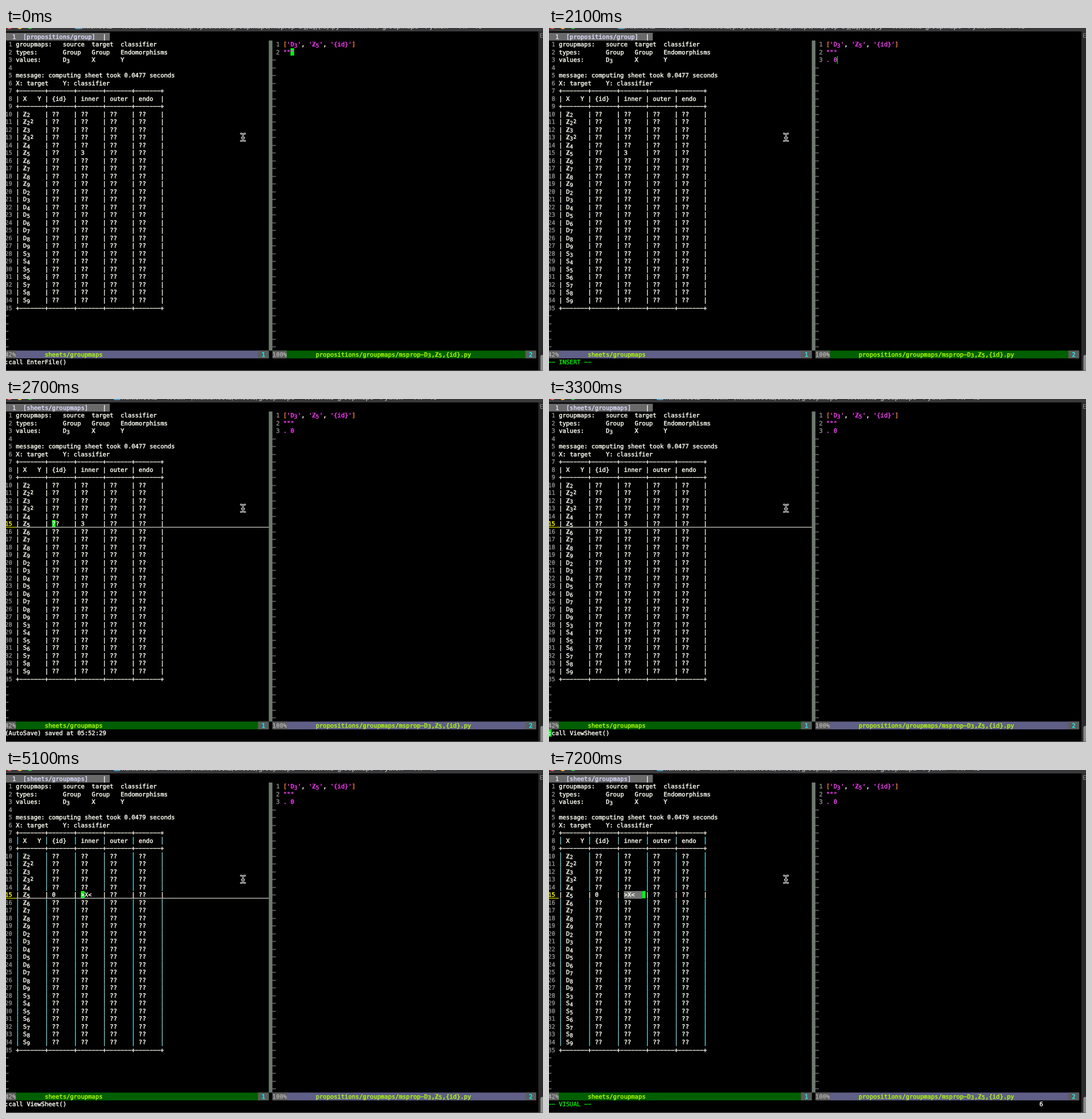
Write an HTML page that moves like this. It is 937 px wide and 598 px high and loops after 8000 ms.

```html
<!DOCTYPE html>
<html lang="en">
<head>
<meta charset="utf-8">
<title>Group maps sheet</title>
<style>
  html, body { margin: 0; width: 100%; height: 100%; overflow: hidden; background: #000; }
  svg { display: block; width: 937px; height: 598px; }
  text { text-rendering: geometricPrecision; }
  .mono { font: 10.473px "DejaVu Sans Mono", "DejaVu Sans", monospace; stroke-width: .42px; }
  .title { font: 600 11.6px Inter, "Open Sans", sans-serif; fill: #b4b4b6; }
</style>
</head>
<body>
<svg id="stage" viewBox="0 0 937 598"></svg>
<script>
const LOOP = 8000, CW = 6.305, CH = 13.515, LEFT = -1.7, TOP = 8.3;
const ROWS = 41, SPLIT = 73, RIGHT = 74, GUTTER = 3, CURSOR_ROW = 15;
const C = {
  text: '#fffff4', num: '#8c8c8c', tilde: '#7c7c84', split: '#6e7a70',
  active: '#005f00', idle: '#5f5f87', lime: '#afff00', seg: '#5c5c5c',
  cyan: '#00ffff', rule: '#6fd8dc', string: '#ff3cff', bracket: '#ff8038',
  cursor: '#00f516', select: '#747474', mode: '#00ee00', yellow: '#ffff00'
};
const PIPES = [0, 8, 16, 24, 32, 40];
const SUB = '₀₁₂₃₄₅₆₇₈₉';
const sub = (letter, from, to) =>
  Array.from({ length: to - from + 1 }, (_, i) => letter + SUB[from + i]);
const GROUPS = ['ℤ₂', 'ℤ₂²', 'ℤ₃', 'ℤ₃²', ...sub('ℤ', 4, 9), ...sub('D', 2, 9), ...sub('S', 3, 9)];
const PROP = 'propositions/groupmaps/msprop-D₃,ℤ₅,{id}.py';
const SHEET = 'sheets/groupmaps';

// Each step changes part of the state; cursor is [row, column, shape].
const right = (row, col, shape) => [row, RIGHT + GUTTER + col, shape];
const cell = col => [CURSOR_ROW, GUTTER + col, 'block'];
const visual = (col, count) => ({ cursor: cell(col), cmd: '-- VISUAL --', count, line: false });
const STEPS = [
  [0, { file: PROP, icon: 121, tab: 'propositions/group', cmd: ':call EnterFile()',
        cursor: right(2, 2, 'block'), typed: null, sheet: false, done: false, line: false, count: 0 }],
  [300, { file: PROP + ' [+]', icon: 112, cmd: '-- INSERT --', typed: '', cursor: right(3, 0, 'bar') }],
  [600, { typed: '.', cursor: right(3, 1, 'bar') }],
  [900, { typed: '. ', cursor: right(3, 2, 'bar') }],
  [1800, { typed: '. 0', cursor: right(3, 3, 'bar') }],
  [2100, { file: PROP, icon: 121 }],
  [2250, { cmd: '(AutoSave) saved at 05:52:29', cursor: right(3, 2, 'block') }],
  [2550, { file: SHEET, icon: 188 }],
  [2700, { tab: SHEET, sheet: true, line: true, cursor: cell(10) }],
  [3300, { cmd: ':call ViewSheet()', cursor: [42, 0, 'block'] }],
  [3450, { done: true, cursor: cell(10) }],
  [4200, { cursor: cell(16) }],
  [4800, { cursor: cell(17) }],
  [5100, { cursor: cell(18) }],
  [5400, visual(18, 1)],
  [5700, visual(19, 2)],
  [6150, visual(20, 3)],
  [6600, visual(24, 7)],
  [7200, visual(23, 6)]
];

const px = col => LEFT + col * CW;
const py = row => TOP + row * CH;
const esc = s => s.replace(/&/g, '&amp;').replace(/</g, '&lt;').replace(/>/g, '&gt;');
const rect = (x, y, w, h, fill, extra = '') =>
  `<rect x="${x}" y="${y}" width="${w}" height="${h}" fill="${fill}" ${extra}/>`;
const fillCells = (row, col, n, fill) => rect(px(col), py(row), n * CW, CH, fill);

// Words sit on the character grid; raised and lowered digits are large.
function put(row, col, str, color = C.text) {
  const base = py(row) + 10.2;
  const span = m => {
    const x = px(col + m.index), digit = SUB.indexOf(m[0]);
    if (digit >= 0) return `<tspan x="${x}" y="${base + 1.8}" font-size="9.4">${digit}</tspan>`;
    if (m[0] === '²') return `<tspan x="${x}" y="${base - 1.4}" font-size="9">2</tspan>`;
    return `<tspan x="${x}" y="${base}">${esc(m[0])}</tspan>`;
  };
  const words = [...str.replace(/-/g, '−').matchAll(/[ℤ₀-₉²]|[^ℤ₀-₉²\s]+/g)];
  return `<text class="mono" fill="${color}" stroke="${color}">${words.map(span).join('')}</text>`;
}

function windowFrame(s) {
  const name = `multisheet2 — NVIM ~/multisheet2/${s.file} — NVIM ms-groupmaps • Python — 147×43`;
  const lights = ['#ff5f57', '#febc2e', '#28c840']
    .map((c, i) => `<circle cx="${6 + 18 * i}" cy="-3.4" r="5.3" fill="${c}"/>`).join('');
  return rect(0, 0, 937, 6, '#39393b') + lights +
    rect(s.icon, -8, 11, 10, '#4c9fc9', 'rx="1.5"') +
    `<text class="title" x="475" y="1.4" text-anchor="middle">${esc(name)}</text>` +
    rect(929, 6, 8, 592, '#2b2b2b') +
    rect(932.5, 570, 7, 34, '#8b8b8b', 'rx="3"') +
    '<path d="M937 9.5H932.5V16.5H937M932.5 13H937" fill="none" stroke="#888"/>' +
    rect(0, 597, 937, 1, '#686868');
}

function tabLine(s) {
  return fillCells(0, 0, 29, '#6a6a6a') + put(0, 2, '1', '#e0e0ff') +
    put(0, 5, `[${s.tab}]`, '#dcdcff') + put(0, 27, '|');
}

function tableRow(cells) {
  return '| ' + cells[0].padEnd(6) + cells.slice(1).map(c => '| ' + c.padEnd(6)).join('') + '|';
}

function sheetLines(s) {
  const border = '+-------'.repeat(5) + '+';
  const body = GROUPS.map((g, i) => {
    const cells = [g, '??', '??', '??', '??'];
    if (i === 5) {
      cells[1] = s.done ? '0' : '??';
      cells[2] = s.done ? '>X<' : '3';
    }
    return tableRow(cells);
  });
  return [
    'groupmaps:   source  target  classifier',
    'types:       Group   Group   Endomorphisms',
    'values:      D₃      X       Y',
    '',
    `message: computing sheet took 0.047${s.done ? 9 : 7} seconds`,
    'X: target    Y: classifier',
    border, tableRow(['X   Y', '{id}', 'inner', 'outer', 'endo']), border,
    ...body, border
  ];
}

function sheetPane(s) {
  let out = '';
  sheetLines(s).forEach((line, i) => {
    const row = i + 1, current = s.sheet && row === CURSOR_ROW;
    out += put(row, 0, String(row).padStart(2), current ? C.yellow : C.num);
    if (s.done && !current && line[0] === '|') {
      line = line.replace(/\|/g, ' ');
      out += PIPES.map(c => rect(px(GUTTER + c + .5) - .65, py(row), 1.3, CH, C.rule)).join('');
    }
    out += put(row, GUTTER, line);
  });
  for (let row = 36; row < ROWS; row++) out += put(row, 0, '~', C.tilde);
  if (s.line) out += rect(0, 223, px(SPLIT), 1, '#f0f0e8');
  if (s.sheet) out += rect(0, 223, px(GUTTER), 1, C.yellow);
  return out;
}

function codePane(s) {
  const col = RIGHT + GUTTER, used = s.typed === null ? 2 : 3;
  let out = put(1, col, "[                  ]", C.bracket) +
    put(1, col, "     ,     ,", C.text) +
    put(1, col, " 'D₃'  'ℤ₅'  '{id}'", C.string) +
    put(2, col, '"""', C.string) + put(3, col, s.typed || '', C.string);
  for (let row = 1; row < ROWS; row++)
    out += row <= used ? put(row, RIGHT, ' ' + row, C.num) : put(row, RIGHT, '~', C.tilde);
  return out;
}

function statusBar(col, end, active, percent, file, at, id) {
  return fillCells(ROWS, col, end - col, active ? C.active : C.idle) +
    fillCells(ROWS, col, percent.length, C.seg) + fillCells(ROWS, end - 3, 3, C.seg) +
    put(ROWS, col, percent, '#aaaaaa') + put(ROWS, at, file, C.lime) +
    put(ROWS, end - 2, id, C.cyan);
}

function cursor(s) {
  const [row, col, shape] = s.cursor;
  const start = GUTTER + 18;
  const picked = s.count > 1 ? fillCells(row, start, col - start, C.select) : '';
  return picked + (shape === 'bar'
    ? rect(px(col), py(row), 1.1, CH, C.cursor)
    : rect(px(col), py(row), CW, CH - .8, C.cursor));
}

function commandLine(s) {
  return put(42, 0, s.cmd, s.cmd.startsWith('--') ? C.mode : C.text) +
    (s.count ? put(42, 136, String(s.count)) : '');
}

function pointer() {
  const beam = 'M410 184.2H411.5L413.5 186L415.5 184.2H417M413.5 186V195' +
    'M410 196.8H411.5L413.5 195L415.5 196.8H417M411.8 191.5H415.2';
  const line = (color, w) =>
    `<path d="${beam}" fill="none" stroke="${color}" stroke-width="${w}" stroke-linecap="square"/>`;
  return line('#f4f4f4', 2.8) + line('#000', 1);
}

function draw(s) {
  return rect(0, 0, 937, 598, '#000') + windowFrame(s) + tabLine(s) +
    rect(px(SPLIT), py(1), CW, CH * 40, C.split) + cursor(s) +
    sheetPane(s) + codePane(s) +
    statusBar(0, SPLIT, s.sheet, '42%', SHEET, 11, '1') +
    statusBar(RIGHT, 147, !s.sheet, '100%', PROP, 86, '2') +
    commandLine(s) + pointer();
}

const stage = document.getElementById('stage');
let shown = -1;

function update(time) {
  const t = time % LOOP;
  const index = STEPS.filter(([start]) => start <= t).length - 1;
  if (index !== shown) {
    const state = Object.assign({}, ...STEPS.slice(0, index + 1).map(step => step[1]));
    stage.innerHTML = draw(state);
    shown = index;
  }
}

const begun = performance.now();
function tick() {
  update(performance.now() - begun);
  requestAnimationFrame(tick);
}
tick();
</script>
</body>
</html>
```
